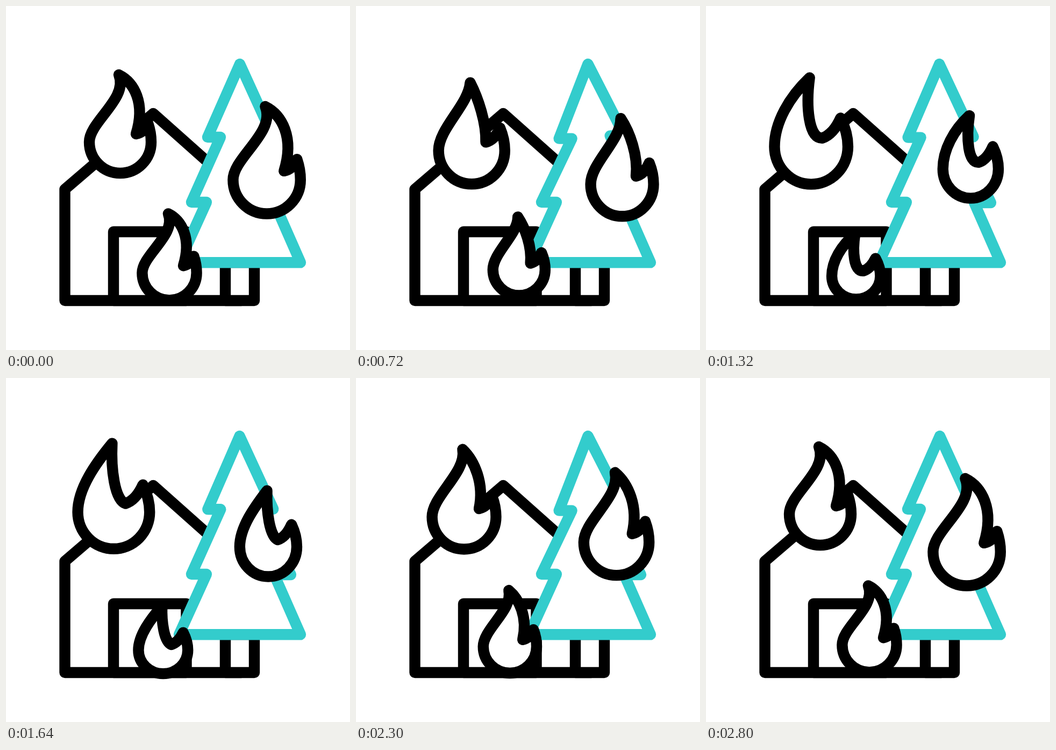
Recreate the animation shown at these times as an HTML page with a canvas. Size 640 by 640 pixels, loop 3.02 s.

```html
<!DOCTYPE html>
<html lang="en">
<head>
<meta charset="utf-8">
<title>Wildfire</title>
<style>
  html, body { margin: 0; height: 100%; overflow: hidden; background: #fff; }
  canvas { display: block; }
</style>
</head>
<body>
<canvas id="stage" width="640" height="640"></canvas>
<script>
const ctx = document.getElementById('stage').getContext('2d');
const LOOP = 3020, START = 220, END = 2800, CYCLE = (END - START) / 2;
const BLACK = '#000', TEAL = '#33cccc';

// Key points of a flame in its two extreme poses.
const curled = {
  tip: [210, 128], outer: [238, 142], inner: [260, 180], notch: [242, 238], bend: [257, 235],
  hook: [264, 218], bottom: [212.5, 311], left: [155, 253], lean: [228, 172]
};
const open = {
  tip: [196.5, 132], outer: [192, 182], inner: [198, 241], notch: [221, 244], bend: [241, 237],
  hook: [254, 208], bottom: [199.5, 329], left: [132, 260], lean: [163, 168]
};

// Each pose is placed by scale x, scale y, left, top; the gusts push the flame around.
const flames = [
  { curled: [1, 1, 0, 0], open: [1, 1, 0, 0],
    gusts: [[0, -10], [0, 0], [8, 13], [-4, -3], [-9, 4]] },
  { curled: [0.88, 0.88, 117, 273.8], open: [0.675, 0.629, 150.4, 338],
    gusts: [[6, 5], [0, 0], [7, -8], [-5, 3], [-14, 2]] },
  { curled: [1.09, 1.09, 253.5, 47.5], open: [0.776, 0.797, 337.6, 101.8],
    gusts: [[-4, 4], [0, 0], [7, 14], [-3, -6], [-2, -15]] }
];
const gustTimes = [0, 130, 240, 510, 760, 790, CYCLE];

const ease = k => (1 - Math.cos(Math.PI * k)) / 2;
const mix = (a, b, k) => a.map((n, i) => n + (b[i] - n) * k);
const place = ([x, y], [sx, sy, dx, dy]) => [x * sx + dx, y * sy + dy];

// Three flickers per cycle, starting slightly ahead of the beat.
function openness(v) {
  const s = v / CYCLE;
  return v ? 1.13 * ease(6 * s + 0.13 * (1 - s)) : 0;
}

function gustAt(v, gusts) {
  const stops = [[0, 0], ...gusts, [0, 0]];
  const i = gustTimes.findIndex((_, n) => v < gustTimes[n + 1]);
  const k = (v - gustTimes[i]) / (gustTimes[i + 1] - gustTimes[i]);
  return mix(stops[i], stops[i + 1], ease(k));
}

function paint(path, color) {
  ctx.fillStyle = '#fff';
  ctx.strokeStyle = color;
  ctx.fill(path);
  ctx.stroke(path);
}

function polygon(...points) {
  const path = new Path2D();
  points.forEach(p => path.lineTo(...p));
  path.closePath();
  return path;
}

function flamePath(flame, v) {
  const k = openness(v), gust = gustAt(v, flame.gusts), p = {};
  for (const name in curled) {
    const at = mix(place(curled[name], flame.curled), place(open[name], flame.open), k);
    p[name] = [at[0] + gust[0], at[1] + gust[1]];
  }
  const [cx, base] = p.bottom, [left, cy] = p.left;
  const rx = cx - left, ry = base - cy;
  const path = new Path2D();
  path.moveTo(...p.tip);
  path.bezierCurveTo(...p.outer, ...p.inner, ...p.notch);
  path.quadraticCurveTo(...p.bend, ...p.hook);
  path.quadraticCurveTo(cx + rx, (p.hook[1] + cy) / 2, cx + rx, cy);
  path.ellipse(cx, cy, rx, ry, 0, 0, Math.PI);
  path.bezierCurveTo(left, cy - ry * 0.65, ...p.lean, ...p.tip);
  path.closePath();
  return path;
}

// The top bends left while the upper branches tilt the other way.
function treePath(v) {
  const sway = ease(2 * v / CYCLE);
  const branch = (x, side) => [x + 3 * sway, 244 - 3 * side * sway];
  return polygon(
    [435 - 4 * sway, 108], branch(497, 1), branch(470, 1), [530, 366], [499, 366], [548, 477.3],
    [322, 477.3], [373, 365], [345, 365], branch(399, -1), branch(375, -1));
}

const house = polygon([109.5, 548], [109.5, 341], [274, 200], [438, 346], [438, 548]);
const door = polygon([200, 548], [200, 420], [335.5, 420], [335.5, 548]);
const trunk = polygon([408, 477], [462, 477], [462, 548], [408, 548]);

function draw(now) {
  const t = now % LOOP;
  const v = t > START && t < END ? (t - START) % CYCLE : 0;
  ctx.clearRect(0, 0, 640, 640);
  ctx.lineWidth = 20.4;
  ctx.lineJoin = 'round';
  [house, door, trunk].forEach(part => paint(part, BLACK));
  paint(treePath(v), TEAL);
  flames.forEach(flame => paint(flamePath(flame, v), BLACK));
  requestAnimationFrame(draw);
}
requestAnimationFrame(draw);
</script>
</body>
</html>
```
